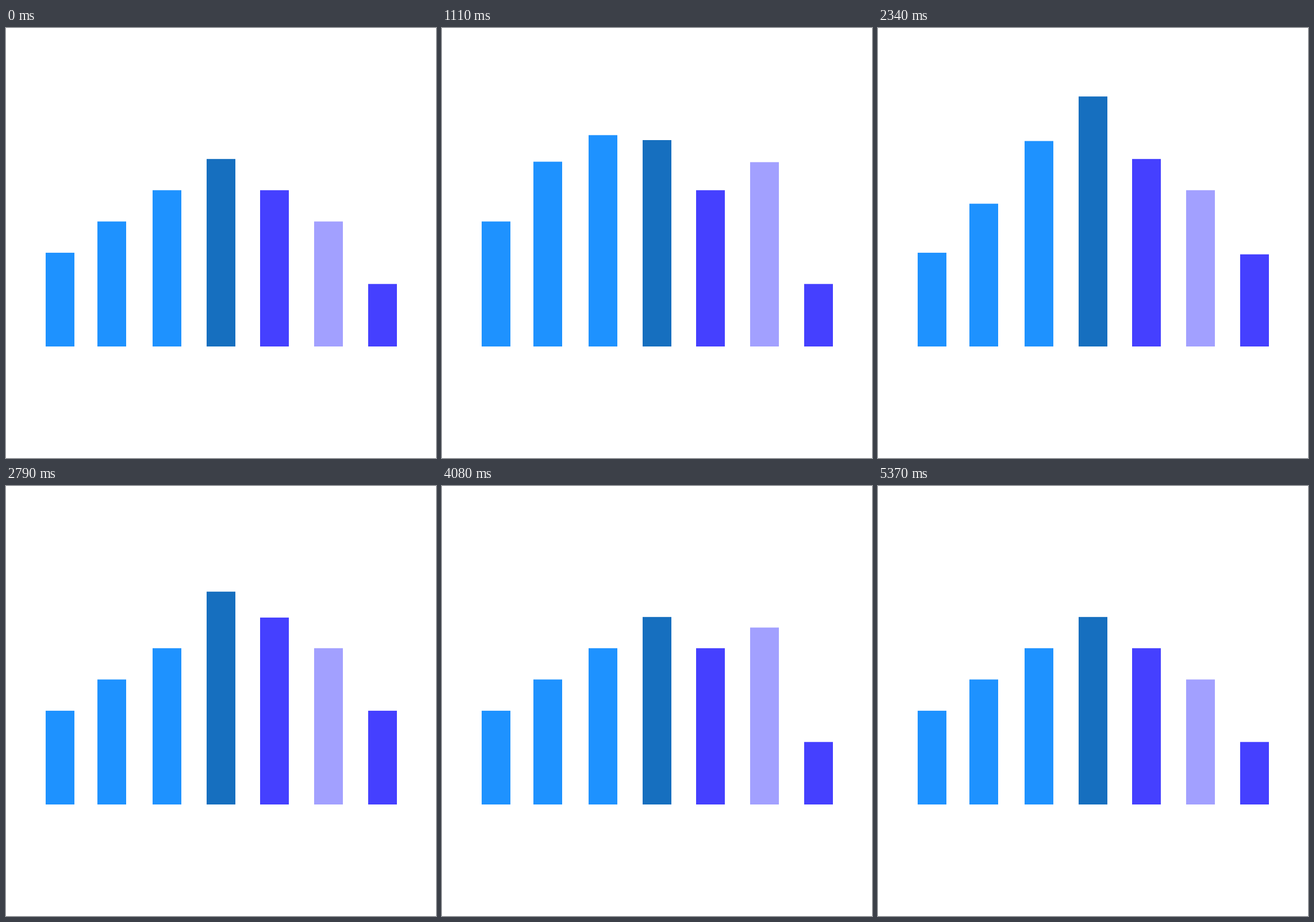
An HTML page with a canvas that plays this animation: 748x748 px, repeating every 5.4 s.

```html
<!DOCTYPE html>
<html lang="en">
<head>
<meta charset="utf-8">
<title>Bars</title>
<style>
  html, body { margin: 0; width: 100%; height: 100%; overflow: hidden; background: #fff; }
  canvas { display: block; }
</style>
</head>
<body>
<canvas id="stage" width="748" height="748"></canvas>
<script>
const ctx = document.getElementById('stage').getContext('2d');
const STEP = 30, STEPS = 180;
const BASE = 554, UNIT = 54.36, BAR_W = 50;
const SKY = '#1e92ff', NAVY = '#166fbf', VIOLET = '#4540ff', LILAC = '#a2a0ff';

// Each move is [first step, last step, new height in units].
const bars = [
  { x: 69, color: SKY, rest: 3, moves: [[0, 18, 4], [53, 73, 3]] },
  { x: 159, color: SKY, rest: 4, moves: [[4.5, 40, 6], [63, 85, 4]] },
  { x: 255, color: SKY, rest: 5, moves: [[22, 40, 7], [72.9, 92.9, 5]] },
  { x: 349, color: NAVY, rest: 6, moves: [[31, 49, 8], [82, 101, 6]] },
  { x: 442, color: VIOLET, rest: 5, moves: [[39.5, 57.5, 6], [92, 112, 5]] },
  { x: 536, color: LILAC, rest: 4, moves: [[8, 40, 6], [48.8, 66.8, 5], [101.4, 124, 6], [124.2, 179, 4]] },
  { x: 630, color: VIOLET, rest: 2, moves: [[65.6, 79.3, 3], [113.2, 134.4, 2]] }
];
const line = { from: 62, to: 717, y: 601, width: 18, color: '#ff0058', tail: [15.6, 33.4], head: [0, 33.5] };

// cubic-bezier(1/6, 0, 5/6, 1)
function ease(x) {
  if (x <= 0) return 0;
  if (x >= 1) return 1;
  let lo = 0, hi = 1;
  for (let i = 0; i < 24; i++) {
    const s = (lo + hi) / 2, r = 1 - s;
    if (0.5 * s * r * r + 2.5 * s * s * r + s * s * s < x) lo = s;
    else hi = s;
  }
  return lo * lo * (3 - 2 * lo);
}

const progress = (n, start, end) => ease((n - start) / (end - start));

function heightAt(bar, n) {
  let h = bar.rest;
  for (const [start, end, next] of bar.moves) h += (next - h) * progress(n, start, end);
  return h * UNIT;
}

function drawLine(n) {
  if (n <= line.head[0] || n >= line.tail[1]) return;
  const at = range => line.from + (line.to - line.from) * progress(n, ...range);
  ctx.strokeStyle = line.color;
  ctx.lineWidth = line.width;
  ctx.lineCap = 'round';
  ctx.beginPath();
  ctx.moveTo(at(line.tail), line.y);
  ctx.lineTo(at(line.head), line.y);
  ctx.stroke();
}

function draw(ms) {
  const n = Math.floor(ms / STEP + 0.1) % STEPS;
  ctx.fillStyle = '#fff';
  ctx.fillRect(0, 0, 748, 748);
  for (const bar of bars) {
    const h = heightAt(bar, n);
    ctx.fillStyle = bar.color;
    ctx.fillRect(bar.x, BASE - h, BAR_W, h);
  }
  drawLine(n);
}

const begin = performance.now();
function tick() {
  draw(performance.now() - begin);
  requestAnimationFrame(tick);
}
tick();
</script>
</body>
</html>
```
